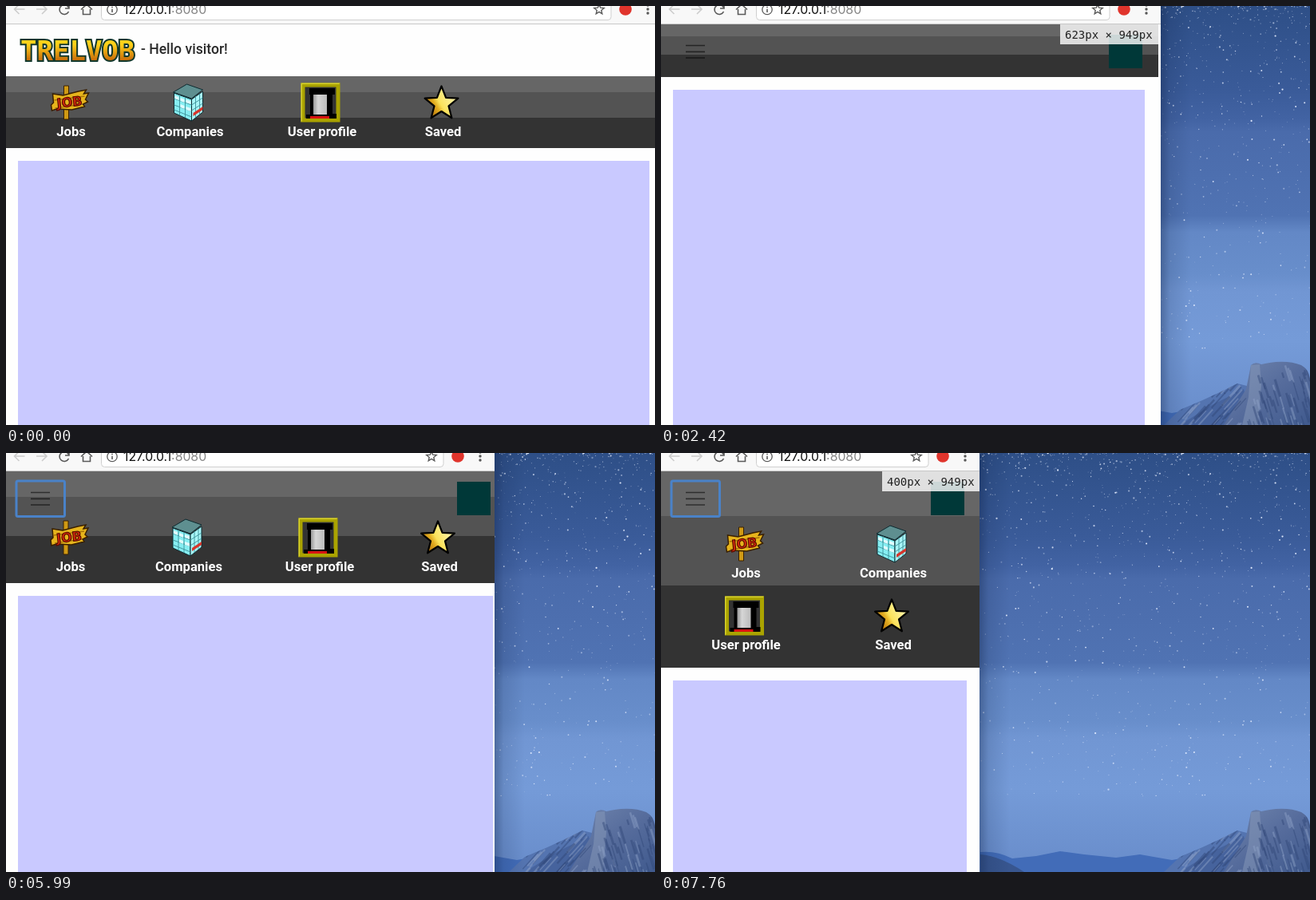
These frames come from a looping animation (813x525 px, 8 s). An HTML page:

```html
<!DOCTYPE html>
<html lang="en">
<head>
<meta charset="utf-8">
<title>Responsive menu</title>
<style>
  html, body { margin: 0; width: 100%; height: 100%; overflow: hidden; background: #fff; }
  svg { display: block; }
  .label { font: 700 16.6px Roboto, sans-serif; fill: #fff; text-anchor: middle; }
  .hello { font: 500 17.6px Roboto, sans-serif; fill: #2b2b2b; }
  .brand { font: 700 34px "DejaVu Sans Mono", monospace; fill: url(#gold); stroke: #12382c; stroke-width: 4; paint-order: stroke; }
  .url { font: 15.8px Inter, sans-serif; }
  .size { font: 14px "DejaVu Sans Mono", monospace; fill: #222; white-space: pre; }
  .line { fill: none; stroke: #5a5a5a; stroke-width: 1.6; }
</style>
</head>
<body>
<svg id="stage" width="813" height="525" viewBox="0 0 813 525">
  <defs>
    <linearGradient id="sky" x2="0" y2="1">
      <stop offset="0" stop-color="#2e4f87"/>
      <stop offset=".2" stop-color="#3a5b99"/>
      <stop offset=".27" stop-color="#4263a3"/>
      <stop offset=".3" stop-color="#4a6bab"/>
      <stop offset=".5" stop-color="#5073b3"/>
      <stop offset=".54" stop-color="#6388c6"/>
      <stop offset=".64" stop-color="#688ecb"/>
      <stop offset=".68" stop-color="#7196d3"/>
      <stop offset=".8" stop-color="#759bd8"/>
      <stop offset="1" stop-color="#688cca"/>
    </linearGradient>
    <linearGradient id="rock" x2="1" y2="1">
      <stop offset="0" stop-color="#7186ae"/>
      <stop offset=".5" stop-color="#566c9c"/>
      <stop offset="1" stop-color="#405a8e"/>
    </linearGradient>
    <linearGradient id="shade">
      <stop offset="0" stop-color="#0a1c40" stop-opacity=".36"/>
      <stop offset=".3" stop-color="#0a1c40" stop-opacity=".13"/>
      <stop offset="1" stop-color="#0a1c40" stop-opacity="0"/>
    </linearGradient>
    <linearGradient id="bar" x2="0" y2="1">
      <stop offset=".2275" stop-color="#666"/>
      <stop offset=".2275" stop-color="#535353"/>
      <stop offset=".5815" stop-color="#535353"/>
      <stop offset=".5815" stop-color="#333"/>
    </linearGradient>
    <linearGradient id="gold" x2="0" y2="1">
      <stop offset=".3" stop-color="#ffd21a"/>
      <stop offset=".8" stop-color="#c96c08"/>
    </linearGradient>
    <linearGradient id="starFill" x1="0" y1=".75" x2=".8" y2=".3">
      <stop offset=".1" stop-color="#b8740a"/>
      <stop offset=".4" stop-color="#e3ae22"/>
      <stop offset=".55" stop-color="#fbe25a"/>
      <stop offset="1" stop-color="#fff3a0"/>
    </linearGradient>
    <linearGradient id="silk">
      <stop offset="0" stop-color="#999"/>
      <stop offset=".35" stop-color="#d6d6d6"/>
      <stop offset="1" stop-color="#bbb"/>
    </linearGradient>
    <path id="dome" d="M705 525L733 480 739 450Q744 445 752 449 782 442 802 450 811 455 813 466V525z"/>
    <path id="slope" d="M630 525L650 506 676 495 700 484 722 473 734 476 745 525z"/>
    <clipPath id="cliff"><use href="#dome"/><use href="#slope"/></clipPath>

    <g id="jobs">
      <path d="M-7-21h6v42h-6z" fill="#d09a14" stroke="#3a2000"/>
      <path d="M-21-11L-8-9 11-14 21-16 18-11 24-12 20-4 23-1 17 2 19 5 3 9-16 8-22 10-23 3-20 0z" fill="#e6b41c" stroke="#3a2000" stroke-width="1.5"/>
      <path d="M-19-3L19-8M-18 7L16 2" stroke="#a87408" stroke-width="1.3"/>
      <text transform="rotate(-6)" y="5" text-anchor="middle" font-family="DejaVu Sans, sans-serif" font-weight="700" font-size="16" fill="#d42a0c" stroke="#5a0c00" stroke-width="1.2">JOB</text>
    </g>
    <g id="companies" stroke="#0d2a30" stroke-linejoin="round">
      <path d="M-18-12L4-4V23L-18 13z" fill="#86eef2"/>
      <path d="M4-4L18-14V12L4 23z" fill="#a8f6f8"/>
      <path d="M-19-13L-2-23 18-16 4-5z" fill="#5e8f90"/>
      <path d="M-18-5L4 3M-18 3L4 11M-18 9L4 18M-11-10V16M-4-7V19M4 3L18-6M4 10L18 1M9-8V19M14-11V15" fill="none" stroke="#3c9098" stroke-width=".9"/>
      <path d="M-17-9l5 2v4l-5-2zM-10-6l5 2v4l-5-2zM-3-4l6 2v4l-6-2zM-10 2l5 2v4l-5-2zM-3 5l6 2v4l-6-2z" fill="#dffcff" stroke="none"/>
      <path d="M6 13L18 5V9L6 17z" fill="#d6352b" stroke="none"/>
    </g>
    <g id="profile">
      <path d="M-22-22h44v44h-44z" fill="#333" stroke="#aaa300" stroke-width="5"/>
      <path d="M-24.5-24.5h49l-1.5 1.5h-46v46l-1.5 1.5z" fill="#d8d22c"/>
      <path d="M-14-18H18V-10H15V14H20V20H-18V15H-13V-10H-14z" fill="#000"/>
      <path d="M-9-10H8V15H-9z" fill="url(#silk)"/>
      <path d="M-13 17H11V20H-13z" fill="#d81212"/>
    </g>
    <path id="saved" fill="url(#starFill)" stroke="#000" stroke-width="2.2" stroke-linejoin="round"/>
  </defs>

  <rect width="813" height="525" fill="url(#sky)"/>
  <g id="stars" fill="#e6eeff"></g>
  <path d="M400 500Q420 498 440 508L470 505 500 499 530 503 570 507 600 503 640 510 680 503V525H400z" fill="#426cb8"/>
  <path d="M400 503Q425 505 455 525H400z" fill="#38568f"/>
  <use href="#slope" fill="#5474b0"/>
  <path d="M650 525L690 500 730 480 740 525z" fill="#46639d"/>
  <use href="#dome" fill="url(#rock)"/>
  <path d="M739 450L750 449 752 475 748 525H728L736 490z" fill="#8597b8" opacity=".55"/>
  <g id="cracks" clip-path="url(#cliff)" fill="none"></g>
  <rect id="shadow" width="38" height="525" fill="url(#shade)"/>

  <svg id="win" height="525">
    <rect width="830" height="525" fill="#fefefe"/>
    <g id="page">
      <g id="title">
        <text class="brand" x="18" y="68">TRELVOB</text>
        <text class="hello" x="169" y="60">- Hello visitor!</text>
      </g>
      <rect id="head" fill="url(#bar)"/>
      <g id="narrow">
        <path d="M31 49.5H55M31 57.3H55M31 65H55" stroke="#000" stroke-opacity=".55" stroke-width="1.7"/>
        <rect id="focus" x="13" y="35" width="60.5" height="44.5" rx="2" fill="none" stroke="#4a82c8" stroke-width="3"/>
        <rect id="mark" y="36" width="42" height="42" fill="#003838"/>
      </g>
      <svg id="nav" width="830"></svg>
      <rect id="body" x="15" height="525" fill="#c9c9ff"/>
      <g id="tip">
        <rect y="23" width="123" height="25" fill="#fff" fill-opacity=".8"/>
        <text class="size" id="size" x="6" y="41"></text>
      </g>
    </g>
    <rect width="830" height="23" fill="#f8f8f8"/>
    <path d="M0 22.5H830" stroke="#c9c9c9"/>
    <rect id="field" x="119.5" y="-12" height="29.5" rx="4" fill="#fff" stroke="#cfcfcf"/>
    <path class="line" d="M23.5 4H11M16.5-2L10.5 4 16.5 10M38 4H50.5M45-2L51 4 45 10" style="stroke:#cdcdcd"/>
    <path class="line" d="M78.5 2A6 6 0 1 0 78.5 7M79-2V3H74"/>
    <path class="line" d="M94 4.5L101-2 108 4.5M96.5 4V10.5H105.5V4"/>
    <circle class="line" cx="133" cy="4.5" r="6.2" style="stroke-width:1.3"/>
    <path class="line" d="M133 3.8V8M133 .8V2.2"/>
    <text class="url" x="147" y="9.5" fill="#111">127.0.0.1<tspan fill="#858585">:8080</tspan></text>
    <g id="tools">
      <path id="fav" class="line" style="stroke-width:1.4"/>
      <circle cx="-46" cy="4" r="7.8" fill="#e0342c"/>
      <g fill="#555"><circle cx="-18" cy="-1" r="1.7"/><circle cx="-18" cy="4" r="1.7"/><circle cx="-18" cy="9" r="1.7"/></g>
    </g>
  </svg>
</svg>
<script>
const $ = id => document.getElementById(id);
const set = (id, attrs) => { for (const k in attrs) $(id).setAttribute(k, attrs[k]); };
const show = (id, on) => set(id, { visibility: on ? 'visible' : 'hidden' });

const LOOP = 8000, GAP = 147, TOP = 23;

function starPath(cx, cy, outer, inner) {
  let d = '';
  for (let i = 0; i < 10; i++) {
    const r = i % 2 ? inner : outer, a = i * Math.PI / 5 - Math.PI / 2;
    d += (i ? 'L' : 'M') + (cx + r * Math.cos(a)).toFixed(1) + ' ' + (cy + r * Math.sin(a)).toFixed(1);
  }
  return d + 'z';
}
set('saved', { d: starPath(0, 1.5, 22, 9.5) });
set('fav', { d: starPath(-79, 4.5, 6.5, 2.9) });

let seed = 11;
const rnd = () => (seed = seed * 16807 % 2147483647) / 2147483647;
const repeat = (n, part) => Array.from({ length: n }, part).join('');

// night sky, denser towards the top
$('stars').innerHTML = repeat(1300, () => {
  const x = 400 + rnd() * 413, y = 430 * rnd() ** 2, r = .45 + .7 * rnd() ** 4;
  return `<circle cx="${x.toFixed(1)}" cy="${y.toFixed(1)}" r="${r.toFixed(2)}" opacity="${(.3 + rnd() * .65).toFixed(2)}"/>`;
});

// light and dark streaks: steep on the dome, leaning on the slope
$('cracks').innerHTML = repeat(130, () => {
  const x = 640 + rnd() * 173, y = 448 + rnd() * 75, len = 6 + rnd() * 20;
  const lean = x > 735 ? .3 : -.9;
  return `<path d="M${x.toFixed(1)} ${y.toFixed(1)}l${(len * lean).toFixed(1)} ${len.toFixed(1)}" ` +
    `stroke="${rnd() < .45 ? '#8fa3c8' : '#2f4677'}" stroke-width="${(1 + rnd() * 2).toFixed(1)}" opacity=".45"/>`;
});

const items = [['jobs', 'Jobs'], ['companies', 'Companies'], ['profile', 'User profile'], ['saved', 'Saved']];
$('nav').innerHTML = items.map(([id, text], i) =>
  `<g id="item${i}"><use href="#${id}" x="-2" y="-42"/><text class="label">${text}</text></g>`).join('');

// right edge of the window after each step of a drag
const drags = [
  [500, [820, 812, 798, 780, 757, 729, 704, 695]],
  [1680, [686, 672, 652, 632, 622, 626, 626, 626]],
  [5990, [612, 600, 578, 551, 511, 490, 475, 465]],
  [7170, [448, 432, 414, 399, 399]]
];
const opening = [0, 0, 0, .15, .45, .8, .96, 1];
const stepAt = (t, start) => Math.floor((t - start + 3) / GAP);

// the page layout trails the window edge by one step
function windowAt(t) {
  let edge = 822, prev = 822;
  for (const [start, edges] of drags) {
    const n = Math.min(stepAt(t, start), edges.length - 1);
    for (let i = 0; i <= n; i++) { prev = edge; edge = edges[i]; }
  }
  return { edge, vw: prev + 1 };
}

function place(i, vw, wide, two) {
  if (wide) return [[81.5, 230.5, 396, 547.5][i], 163];
  if (two) {
    const d = vw - 400;
    return [i % 2 ? 291 + d * .553 : 106.5 + d * .447, i < 2 ? 156 : 246];
  }
  return [[81, 229, 393, 543][i] * Math.min(1, vw / 627), 148];
}

function render(t) {
  const { edge, vw } = windowAt(t);
  const wide = vw >= 768, two = vw < 576;
  const k = Math.min(stepAt(t, 3010), 7);
  const open = k < 0 ? 0 : opening[k];
  const top = wide ? 88 : TOP;
  const height = wide ? 90 : 66 + open * (two ? 180 : 74);
  const bottom = top + height;

  set('win', { width: edge });
  set('shadow', { x: edge });
  set('field', { width: edge - 64 - 119.5 });
  set('tools', { transform: `translate(${edge} 0)` });

  show('title', wide);
  show('narrow', !wide);
  show('focus', !wide && k >= 2);
  set('mark', { x: vw - 62 });
  set('head', { y: top, width: vw, height });
  set('body', { y: bottom + 16, width: vw - 32 });

  show('nav', wide || open > 0);
  set('nav', { height: bottom });
  items.forEach((_, i) => set('item' + i, { transform: `translate(${place(i, vw, wide, two)})` }));

  show('tip', t > 643 && t < 3007 || t > 6133);
  set('tip', { transform: `translate(${vw - 123} 0)` });
  $('size').textContent = vw + 'px × 949px';
}

const begin = performance.now();
function tick() {
  render((performance.now() - begin) % LOOP);
  requestAnimationFrame(tick);
}
tick();
</script>
</body>
</html>
```
